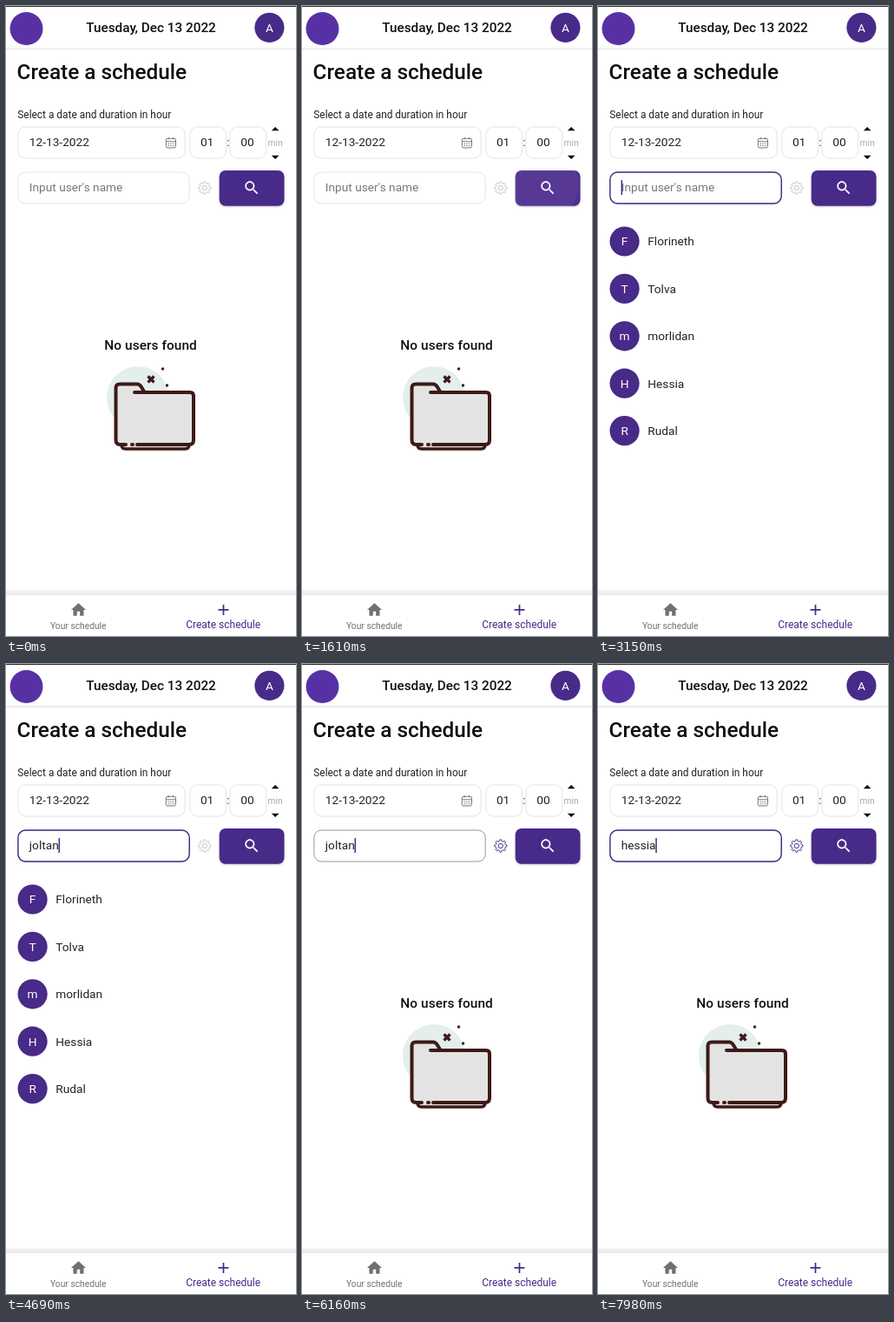
Write an HTML page that moves like this. It is 334 by 724 pixels and loops after 8 s.

```html
<!DOCTYPE html>
<html lang="en">
<head>
<meta charset="utf-8">
<title>Create a schedule</title>
<style>
  html, body { margin: 0; width: 100%; height: 100%; overflow: hidden; background: #fff; }
  svg { display: block; width: 100%; height: 100%; }
  text { font: 13.7px Roboto, sans-serif; fill: #222; white-space: pre; }
  .mid { text-anchor: middle; }
  .strong { font-weight: 500; fill: #0f0f0f; }
  .purple { fill: #482a89; }
  .white { fill: #fff; }
  .field { fill: #fff; stroke: #e4e4e4; }
  .ink { fill: none; stroke: #3d1a17; stroke-width: 4; stroke-linecap: round; stroke-linejoin: round; }
</style>
</head>
<body>
<svg viewBox="0 0 334 724">
  <defs>
    <linearGradient id="navShade" x2="0" y2="1">
      <stop stop-color="#fff"/><stop offset=".25" stop-color="#f6f6f6"/><stop offset="1" stop-color="#e6e6e6"/>
    </linearGradient>
    <filter id="shadow" x="-20%" y="-20%" width="140%" height="150%" color-interpolation-filters="sRGB">
      <feDropShadow dx="0" dy="1" stdDeviation="1.1" flood-opacity=".22"/>
    </filter>
    <clipPath id="buttonClip"><rect x="245.7" y="188.9" width="74.8" height="40.8" rx="7"/></clipPath>
  </defs>

  <!-- header -->
  <rect width="334" height="1" fill="#333"/>
  <rect y="48.5" width="334" height="1" fill="#dadada"/>
  <rect y="49.5" width="334" height="1" fill="#f3f3f3"/>
  <circle cx="23.5" cy="26" r="19" fill="#5731a4"/>
  <text class="mid strong" x="167" y="30.1" style="font-size:15.3px">Tuesday, Dec 13 2022</text>
  <circle class="purple" cx="303.4" cy="24.8" r="17.1"/>
  <text class="mid white" x="303.4" y="29.5">A</text>

  <!-- form -->
  <text class="strong" x="12.6" y="84.1" style="font-size:24.35px">Create a schedule</text>
  <text x="13.3" y="128.6" style="font-size:11.9px">Select a date and duration in hour</text>
  <rect class="field" x="13.8" y="139" width="192.3" height="36" rx="8.5"/>
  <text x="26.8" y="161.1">12-13-2022</text>
  <g fill="none" stroke="#777">
    <rect x="184.3" y="152.3" width="11.2" height="10.7" rx="1.8"/>
    <path d="M184.5 155.8h11M187.2 150.8v2.6M192.6 150.8v2.6"/>
    <path d="M186.7 158.3h7M186.7 160.6h7" stroke-dasharray="1.4 1.2"/>
  </g>
  <rect class="field" x="212" y="139" width="41.7" height="36" rx="8.5"/>
  <text class="mid" x="231.6" y="161.1">01</text>
  <text class="mid" x="255.8" y="161.1">:</text>
  <rect class="field" x="258" y="139" width="41.7" height="36" rx="8.5"/>
  <text class="mid" x="278" y="161.1">00</text>
  <path d="M305.8 143.2l4.3-4.3 4.3 4.3zM305.8 171.8l4.3 4.3 4.3-4.3z"/>
  <text class="mid" x="310" y="160.7" style="font-size:10.2px;fill:#aaa">min</text>

  <rect id="nameBox" class="field" x="13.9" y="191" width="197.3" height="36" rx="8.5"/>
  <rect id="selection" x="27" y="200" height="17.5" fill="#b3d4fc"/>
  <text id="nameText" x="26.8" y="213.1"></text>
  <rect id="caret" class="purple" y="200" width="1.5" height="17"/>
  <g id="gear" fill="none" transform="translate(228.8 209)">
    <path id="teeth" stroke-linejoin="round"/><circle r="2.6"/>
  </g>

  <rect id="button" x="245.7" y="188.9" width="74.8" height="40.8" rx="7" filter="url(#shadow)"/>
  <g clip-path="url(#buttonClip)"><circle id="ripple" class="white" cx="279" cy="205"/></g>
  <path class="white" transform="translate(272.7 198.7) scale(.856)" d="M15.5 14h-.79l-.28-.27C15.41 12.59 16 11.11 16 9.5 16 5.91 13.09 3 9.5 3S3 5.91 3 9.5 5.91 16 9.5 16c1.61 0 3.09-.59 4.23-1.57l.27.28v.79l5 4.99L20.49 19l-4.99-5zm-6 0C7.01 14 5 11.99 5 9.5S7.01 5 9.5 5 14 7.01 14 9.5 11.99 14 9.5 14z"/>

  <g id="users"></g>

  <g id="empty">
    <text class="mid strong" x="166.6" y="395" style="font-size:15.4px;letter-spacing:.07px">No users found</text>
    <circle cx="152" cy="450" r="36" fill="#e3eeed"/>
    <path d="M133 504Q133 509 138 509H206Q211 509 211 504" class="ink" style="stroke-width:3.4;fill:#e3e3e3"/>
    <path d="M126.5 439Q126.5 434.5 131 434.5H151Q154 434.5 156 438L159 444H212Q216 444 216 448V499Q216 504 211 504H131.5Q126.5 504 126.5 499Z" fill="#e3e3e3"/>
    <path class="ink" d="M148 444H212Q216 444 216 448V499Q216 504 211 504H151M145 504h1M138 504H131.5Q126.5 504 126.5 499V439Q126.5 434.5 131 434.5H151Q154 434.5 156 438L159 443"/>
    <path class="ink" style="stroke-width:3.2;stroke-linecap:butt" d="M163.5 425.5l7 7M170.5 425.5l-7 7"/>
    <g fill="#3d1a17"><circle cx="180.5" cy="417" r="1.7"/><circle cx="185.5" cy="436" r="1.7"/></g>
  </g>

  <!-- bottom navigation -->
  <rect y="670" width="334" height="7" fill="url(#navShade)"/>
  <rect y="677" width="334" height="47" fill="#fff"/>
  <path fill="#707070" transform="translate(73.2 683.7) scale(.856)" d="M10 20v-6h4v6h5v-8h3L12 3 2 12h3v8z"/>
  <text class="mid" x="83.3" y="715.6" style="font-size:10.27px;fill:#707070">Your schedule</text>
  <path class="purple" transform="translate(240.2 683.7) scale(.856)" d="M19 13h-6v6h-2v-6H5v-2h6V5h2v6h6z"/>
  <text class="mid purple" x="250.2" y="715" style="font-size:11.98px">Create schedule</text>
</svg>

<script>
const LOOP = 8000;
const PURPLE = [72, 42, 137], PRESSED = [82, 48, 147], FOCUSED = [58, 36, 128];
const PALE = [196, 196, 196], GREY = [150, 150, 150];
const TAP = 1220, LISTED = 1890, FOCUS = 3150, SUBMIT = 4830, REFOCUS = 6160, SELECT = 6580;
const queries = [
  { word: 'joltan', keys: [4060, 4130, 4200, 4270, 4480, 4620] },
  { word: 'hessia', keys: [7280, 7350, 7560, 7630, 7770, 7980] }
];

const $ = id => document.getElementById(id);
const set = (id, attrs) => Object.entries(attrs).forEach(([key, value]) => $(id).setAttribute(key, value));
const show = (id, visible) => { $(id).style.display = visible ? '' : 'none'; };
const progress = (t, from, to) => Math.min(1, Math.max(0, (t - from) / (to - from)));
const mix = (a, b, k) => `rgb(${a.map((v, i) => Math.round(v + (b[i] - v) * k))})`;
const smooth = k => k * k * (3 - 2 * k);

$('users').innerHTML = ['Florineth', 'Tolva', 'morlidan', 'Hessia', 'Rudal'].map((name, i) => {
  const y = 270.5 + i * 54.4;
  return `<circle class="purple" cx="30.6" cy="${y}" r="17.1"/>
    <text class="mid white" x="30.6" y="${y + 4.8}">${name[0]}</text>
    <text x="57.3" y="${y + 4.8}">${name}</text>`;
}).join('');

// Eight teeth, four outline points each.
set('teeth', {
  d: 'M' + Array.from({ length: 32 }, (_, i) => {
    const angle = (i - 1.5) * Math.PI / 16, r = i % 4 === 1 || i % 4 === 2 ? 7.2 : 5.5;
    return [Math.sin(angle) * r, -Math.cos(angle) * r].map(v => v.toFixed(2));
  }).join('L') + 'Z'
});

function drawInput(t) {
  const { word, keys } = queries[t < queries[1].keys[0] ? 0 : 1];
  const value = word.slice(0, keys.filter(key => t >= key).length);
  const text = $('nameText');
  text.textContent = value || "Input user's name";
  text.style.fill = value ? '#222' : '#777';
  const width = value ? text.getComputedTextLength() : 0;

  const selected = t >= SELECT && t < queries[1].keys[0];
  const focused = (t >= FOCUS && t < SUBMIT) || t >= REFOCUS;
  const blinkedOff = t >= 3570 && t < queries[0].keys[0];
  show('selection', selected);
  set('selection', { width });
  show('caret', focused && !blinkedOff && !selected);
  set('caret', { x: 26.6 + width });

  const k = t < SUBMIT ? 1 : progress(t, REFOCUS + 20, REFOCUS + 140);
  $('nameBox').style.stroke = focused ? mix(GREY, FOCUSED, k) : '';
  $('nameBox').style.strokeWidth = focused ? 1 + .4 * k : 1;
}

function draw(t) {
  const pressed = progress(t, TAP, TAP + 150) * (1 - progress(t, 1530, 1750));
  set('button', { fill: mix(PURPLE, PRESSED, pressed) });
  set('ripple', {
    r: 50 * smooth(progress(t, TAP, TAP + 550)),
    opacity: t < TAP ? 0 : .12 * (1 - progress(t, 1430, 1750))
  });
  const listed = t >= LISTED && t < SUBMIT;
  show('users', listed);
  show('empty', !listed);
  set('gear', { stroke: mix(PALE, PURPLE, progress(t, SUBMIT, SUBMIT + 280)) });
  drawInput(t);
}

function tick() {
  draw(performance.now() % LOOP);
  requestAnimationFrame(tick);
}
tick();
</script>
</body>
</html>
```
